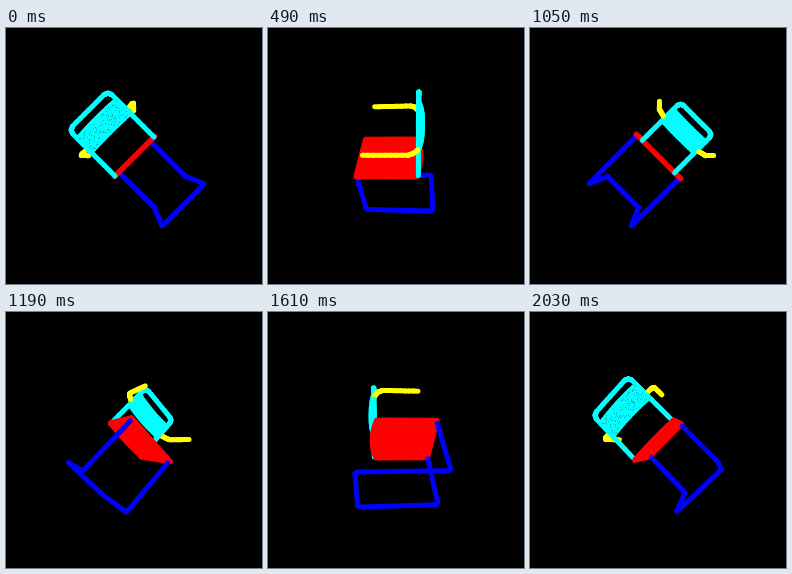
Animation of 256 by 256 pixels, one loop 2.1 s. Source, as an HTML page with a canvas:

```html
<!DOCTYPE html>
<html lang="en">
<head>
<meta charset="utf-8">
<title>Turning chair</title>
<style>
html, body { margin: 0; width: 100%; height: 100%; overflow: hidden; background: #000; }
canvas { display: block; width: 100vw; height: 100vh; }
</style>
</head>
<body>
<canvas id="stage" width="256" height="256"></canvas>
<script>
const ctx = document.getElementById('stage').getContext('2d');
ctx.lineCap = ctx.lineJoin = 'round';

const STEP = 70, STEPS = 30, EYE = 235, CENTER = 128.5, TILT = Math.SQRT1_2;
const BLUE = '#00f', RED = '#f00', CYAN = '#0ff', YELLOW = '#ff0';

// Chair points are [across, up, forward]; the chair leans 45 degrees sideways.
const mirror = points => points.map(([a, b, c]) => [-a, b, c]).reverse();
const bow = (a, base, depth) => base - depth * (1 - (a / 26) ** 2);
const range = (n, f) => Array.from({ length: n + 1 }, (_, i) => f(i / n));

// Cuts a polyline into short pieces that can be sorted by depth.
function cut(points, color, width, n = 8) {
  const pieces = [];
  for (let i = 1; i < points.length; i++) {
    const p = points[i - 1], q = points[i];
    const cuts = range(n, k => p.map((v, j) => v + (q[j] - v) * k));
    for (let j = 0; j < n; j++) pieces.push({ points: [cuts[j], cuts[j + 1]], color, width });
  }
  return pieces;
}

const leg = [[25.5, -2.5, 36], [25.3, -56, 36], [25.3, -58, 34], [25.3, -58, -35], [23.3, -58, -37]];
const legs = cut([...leg, ...mirror(leg)], BLUE, 5, 1);

const seat = {
  points: [[26.5, 0, 36], [-26.5, 0, 36],
    ...range(12, k => { const a = (k - 0.5) * 52; return [a, 0, bow(a, -20, 4)]; })],
  color: RED, width: 5.5, fill: true
};

const post = [[25, 0, -22], [25, 54, -22.5], [23.5, 57.5, -22.5], [20, 59, -22.5]];
const arm = [[34.7, 36, 22], [34.7, 36, -14], [32.5, 36, -18.5], [27.5, 35, -22]];

const panelPoint = (a, b) => [a, b, bow(a, -22, 4)];
const strips = range(11, k => {
  const a = -25.5 + k * 46.75, next = a + 4.25;
  return {
    points: [panelPoint(a, 30), panelPoint(a, 48.5), panelPoint(next, 48.5), panelPoint(next, 30)],
    color: CYAN, width: 3.5, fill: true
  };
});

const upper = [
  ...cut([...post, ...mirror(post)], CYAN, 5),
  ...cut(arm, YELLOW, 5),
  ...cut(mirror(arm), YELLOW, 5),
  ...strips
];

let seed = 7;
const random = () => (seed = seed * 16807 % 2147483647) / 2147483647;
const specks = range(120, () => panelPoint(random() * 48 - 24, 30 + random() * 18));

function project([a, b, c], cos, sin) {
  const x = TILT * (a - b), y = TILT * (a + b);
  const z = -c * cos - x * sin;
  const scale = EYE / (EYE - z);
  return { x: CENTER + (x * cos - c * sin) * scale, y: CENTER - y * scale, z };
}

function draw(time) {
  const angle = Math.floor(time / STEP) % STEPS / STEPS * 2 * Math.PI;
  const cos = Math.cos(angle), sin = Math.sin(angle);

  const paint = ({ points, color, width, fill }) => {
    ctx.beginPath();
    for (const point of points) {
      const { x, y } = project(point, cos, sin);
      ctx.lineTo(x, y);
    }
    ctx.strokeStyle = ctx.fillStyle = color;
    ctx.lineWidth = width;
    if (fill) { ctx.closePath(); ctx.fill(); }
    ctx.stroke();
  };
  const depth = ({ points }) =>
    points.reduce((sum, p) => sum + project(p, cos, sin).z, 0) / points.length;
  const sorted = parts => [...parts].sort((p, q) => depth(p) - depth(q));

  ctx.fillStyle = '#000';
  ctx.fillRect(0, 0, 256, 256);

  // The seat plane separates the legs from everything above it.
  const groups = [sorted(legs), [seat], sorted(upper)];
  if (sin < -0.01) groups.reverse();
  groups.flat().forEach(paint);

  // The panel looks grainy when its back is near.
  if (cos > 0.3) {
    ctx.fillStyle = `rgba(0, 130, 140, ${0.6 * cos})`;
    for (const speck of specks) {
      const { x, y } = project(speck, cos, sin);
      ctx.fillRect(Math.floor(x), Math.floor(y), 1, 1);
    }
  }
}

let start;
function tick(now) {
  start ??= now;
  draw(Math.max(0, now - start));
  requestAnimationFrame(tick);
}
draw(0);
requestAnimationFrame(tick);
</script>
</body>
</html>
```
